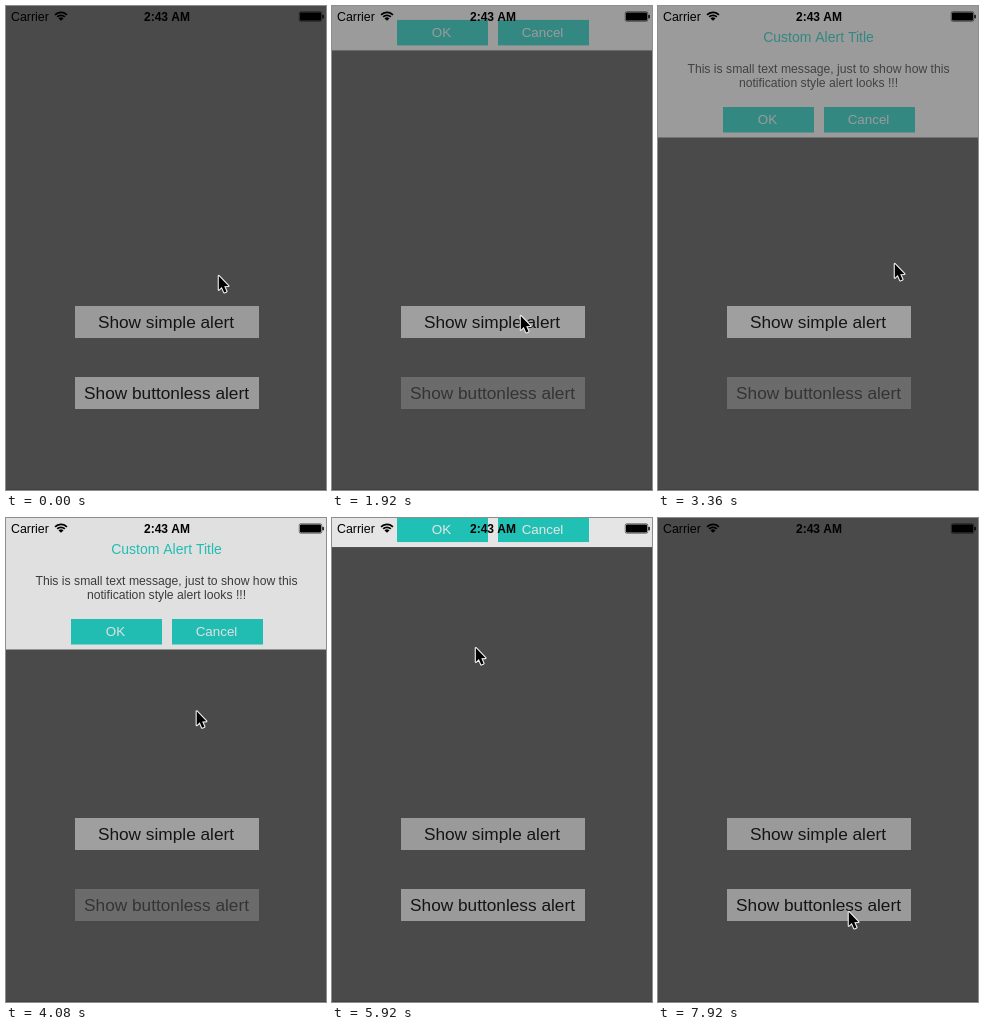
An HTML page with a canvas that plays this animation: 320x484 px, repeating every 8 s.

```html
<!DOCTYPE html>
<html lang="en">
<head>
<meta charset="utf-8">
<title>Notification style alert</title>
<style>
html, body { margin: 0; width: 100%; height: 100%; overflow: hidden; background: #4a4a4a; }
canvas { display: block; width: 320px; height: 484px; }
</style>
</head>
<body>
<canvas id="stage"></canvas>
<script>
const W = 320, H = 484, LOOP = 8000;
const FONT = '"Liberation Sans", Arial, sans-serif';
const BACK = 74;
const WHITE = [255, 255, 255], INK = [56, 56, 56], TEAL = [26, 212, 199];
const ALERT_H = 131.5, DIM = 0.45;

// pointer path: time, x, y
const PATH = [
  [0, 212, 269], [800, 188, 309], [1960, 188, 309], [2400, 213, 276],
  [2840, 226, 265], [3360, 236, 257], [3700, 230, 244], [4480, 147, 138],
  [4880, 132, 119], [5360, 132, 119], [5920, 143, 129], [6760, 204, 269],
  [7120, 187, 335], [7400, 190, 404], [7640, 190, 404], [7920, 190, 393], [8000, 190, 393]
];

const canvas = document.getElementById('stage');
const ctx = canvas.getContext('2d');
const ratio = window.devicePixelRatio || 1;
canvas.width = W * ratio;
canvas.height = H * ratio;

const clamp = v => Math.min(1, Math.max(0, v));
const ramp = (t, from, to) => clamp((t - from) / (to - from));
const smooth = p => p * p * (3 - 2 * p);

function rect(x, y, w, h, color) {
  ctx.fillStyle = color;
  ctx.fillRect(x, y, w, h);
}

function text(str, x, y, size, color, align = 'center', weight = 'normal') {
  ctx.font = `${weight} ${size}px ${FONT}`;
  ctx.textAlign = align;
  ctx.fillStyle = color;
  ctx.fillText(str, x, y);
}

// speed at a path point; zero where the pointer rests
function slope(i, k) {
  const a = PATH[i - 1], b = PATH[i], c = PATH[i + 1];
  if (!a || !c) return 0;
  const still = (p, q) => p[1] === q[1] && p[2] === q[2];
  return still(a, b) || still(b, c) ? 0 : (c[k] - a[k]) / (c[0] - a[0]);
}

function pointerAt(t) {
  let i = 0;
  while (i < PATH.length - 2 && t >= PATH[i + 1][0]) i++;
  const a = PATH[i], b = PATH[i + 1], d = b[0] - a[0], p = (t - a[0]) / d;
  return [1, 2].map(k =>
    a[k] + (b[k] - a[k]) * smooth(p) +
    d * p * (1 - p) * ((1 - p) * slope(i, k) - p * slope(i + 1, k)));
}

function drawButtons(open) {
  rect(69, 300, 184, 32, open ? '#9f9f9f' : '#9a9a9a');
  text('Show simple alert', 160, 322, 17.25, '#141414');
  rect(69, 371, 184, 32, open ? '#6b6b6b' : '#9a9a9a');
  text('Show buttonless alert', 160.5, 392.5, 17.25, open ? '#343434' : '#141414');
}

function drawAlert(t) {
  const enter = smooth(ramp(t, 1180, 3080));
  const leave = smooth(ramp(t, 5220, 6227));
  if (enter === 0 || leave === 1) return;
  const alpha = DIM + (1 - DIM) * smooth(ramp(t, 3400, 4480)) - 0.185 * leave;
  // the panel fades as one layer, so every colour blends with the backdrop
  const [paper, ink, teal] = [WHITE, INK, TEAL].map(c =>
    `rgb(${c.map(v => Math.round(BACK + (v - BACK) * alpha))})`);
  ctx.save();
  ctx.translate(0, -ALERT_H * (1 - enter + leave));
  rect(0, 0, W, ALERT_H, paper);
  rect(65, 101, 91, 25.5, teal);
  rect(166, 101, 91, 25.5, teal);
  text('Custom Alert Title', 160.5, 35.5, 14, teal);
  text('This is small text message, just to show how this', 160.5, 67, 12.2, ink);
  text('notification style alert looks !!!', 160.5, 81, 12.2, ink);
  text('OK', 109.5, 118.3, 13.4, paper);
  text('Cancel', 210.5, 118.3, 13.4, paper);
  ctx.restore();
}

function drawStatus() {
  text('Carrier', 5, 15, 12.4, '#000', 'left');
  text('2:43 AM', 161, 15, 12, '#000', 'center', 'bold');
  ctx.strokeStyle = '#000';
  ctx.lineWidth = 1.7;
  for (const r of [5.2, 8.2]) {
    ctx.beginPath();
    ctx.arc(55, 14.5, r, -Math.PI * 0.76, -Math.PI * 0.24);
    ctx.stroke();
  }
  ctx.fillStyle = '#000';
  ctx.beginPath();
  ctx.moveTo(55, 14.8);
  ctx.arc(55, 14.8, 3.4, -Math.PI * 0.76, -Math.PI * 0.24);
  ctx.fill();
  // battery: thin shell, full charge, cap
  ctx.lineWidth = 0.5;
  ctx.beginPath();
  ctx.roundRect(293.25, 5.75, 22.5, 9.5, 1.5);
  ctx.stroke();
  ctx.beginPath();
  ctx.roundRect(294, 6.5, 21, 8, 1);
  ctx.roundRect(316.3, 8.8, 1.5, 3.6, 0.7);
  ctx.fill();
}

function drawPointer(t) {
  const [x, y] = pointerAt(t);
  ctx.save();
  ctx.translate(x, y);
  ctx.beginPath();
  ctx.moveTo(0.8, 1);
  ctx.lineTo(0.8, 14.8);
  ctx.lineTo(3.8, 12);
  ctx.lineTo(6.2, 17.4);
  ctx.lineTo(8.5, 16.4);
  ctx.lineTo(6.2, 11.2);
  ctx.lineTo(10.4, 11);
  ctx.closePath();
  ctx.lineJoin = 'round';
  ctx.strokeStyle = '#f2f2f2';
  ctx.lineWidth = 2.2;
  ctx.stroke();
  ctx.fillStyle = '#000';
  ctx.fill();
  ctx.restore();
}

function draw(t) {
  ctx.setTransform(ratio, 0, 0, ratio, 0, 0);
  rect(0, 0, W, H, `rgb(${BACK}, ${BACK}, ${BACK})`);
  rect(0, H - 1, W, 1, '#443f45');
  drawButtons(t >= 1160 && t < 5120);
  drawAlert(t);
  drawStatus();
  drawPointer(t);
}

const start = performance.now();
function tick() {
  draw((performance.now() - start) % LOOP);
  requestAnimationFrame(tick);
}
tick();
</script>
</body>
</html>
```
